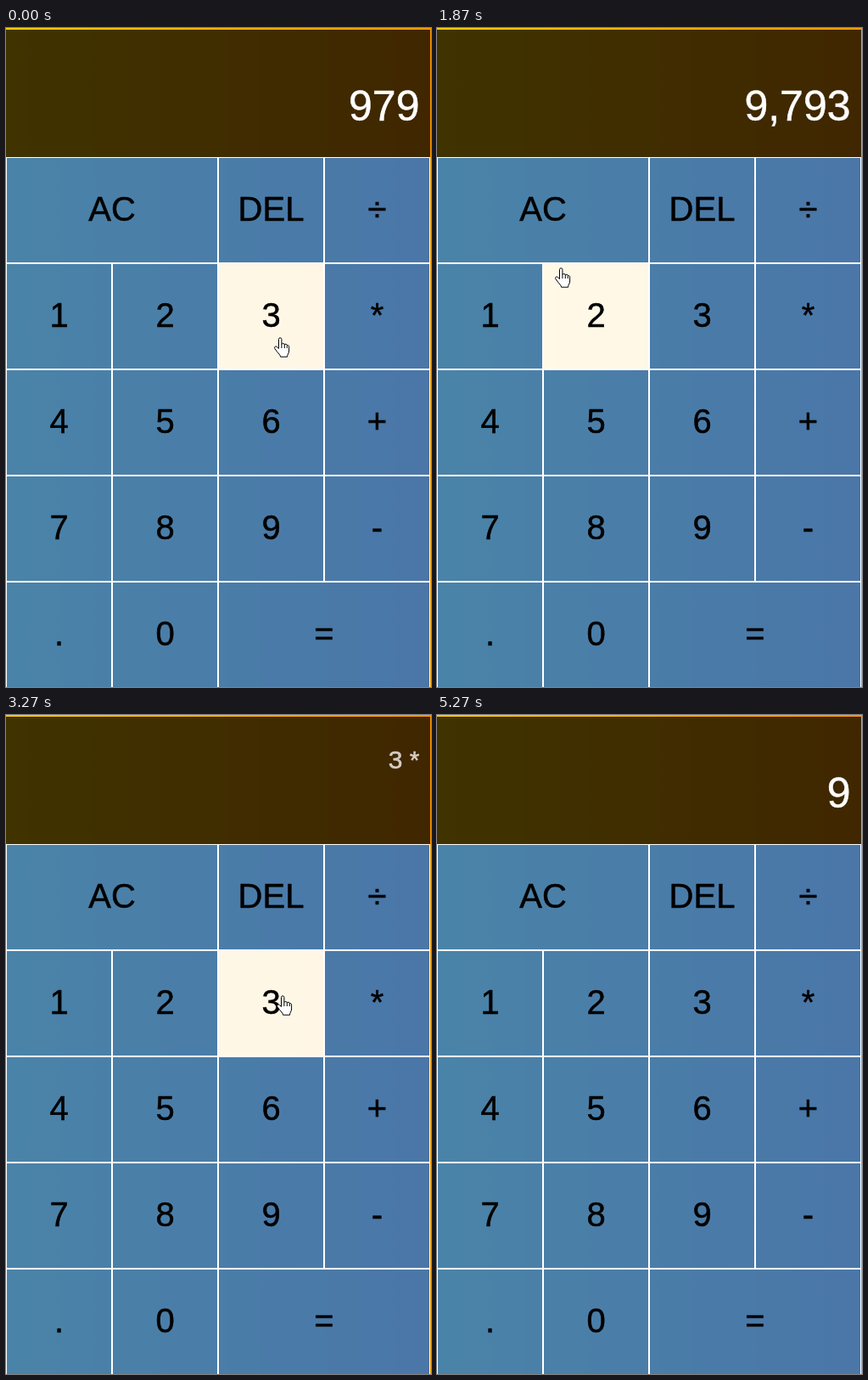
An HTML page that plays this animation: 501 px wide and 776 px high, repeating every 5940 ms.

```html
<!DOCTYPE html>
<html lang="en">
<head>
<meta charset="utf-8">
<title>Calculator</title>
<style>
  html, body { margin: 0; width: 501px; height: 776px; overflow: hidden; }
  body {
    position: relative;
    background: linear-gradient(to right, #fc0, #f90);
    font-family: "Liberation Sans", Arial, sans-serif;
    -webkit-text-stroke: .5px;
  }
  #display { position: absolute; top: 2px; width: 500px; height: 150px; background: rgba(0, 0, 0, .75); }
  #display div { position: absolute; right: 12.5px; white-space: pre; }
  #previous { top: 34px; font-size: 30px; line-height: 33px; color: rgba(255, 255, 255, .75); }
  #current { top: 62px; font-size: 50px; line-height: 56px; color: #fff; }
  #keys {
    position: absolute; top: 152px;
    display: grid; grid-template-columns: repeat(4, 125px); grid-auto-rows: 125px;
  }
  #keys div {
    display: flex; align-items: center; justify-content: center;
    box-sizing: border-box; border: 1px solid #fff; padding-bottom: 2px;
    font-size: 40px; background: rgba(14, 107, 224, .75) padding-box;
  }
  #keys .wide { grid-column: span 2; }
  #keys .hover { background-color: rgba(255, 255, 255, .9); }
  #hand { position: absolute; left: 0; top: 0; overflow: visible; }
</style>
</head>
<body>
<div id="display"><div id="previous"></div><div id="current"></div></div>
<div id="keys"></div>
<svg id="hand" width="18" height="25" fill="#fff" stroke="#000" stroke-linejoin="round">
  <path d="M5.5 13.5V2.5a1.7 1.7 0 0 1 3.4 0V8.6q.3-1.3 1.8-1.2 1.5.1 1.6 1.6 .4-1 1.6-.8 1.3.2 1.4 1.6 .5-.6 1.3-.3 1 .4 1 1.7V16q0 2.2-1.3 4.2-.7 1.2-.7 3H7.6q-.2-1.6-1.6-3.2Q3.6 17.4 1 13.8q-1-1.7.2-2.6 1.3-.8 2.6.6z"/>
  <path fill="none" d="M8.9 8.6v4.4M12.3 9v4M15.3 10v3"/>
</svg>
<script>
const LOOP = 5940, TICK = 1000 / 15, HEIGHT = 776;
const $ = id => document.getElementById(id);

const keys = ['AC', 'DEL', '÷', ...'123*456+789-.0='].map(label => {
  const el = document.createElement('div');
  el.textContent = label;
  if (label === 'AC' || label === '=') el.className = 'wide';
  $('keys').append(el);
  return el;
});

// Pointer moves: start tick, ticks taken, left, top
const home = [316, 364];
const moves = [
  [10, 6, 377, 371], [19, 5, 340, 681], [24, 8, 110, 225], [35, 5, 324, 345],
  [43, 2, 384, 340], [48, 1, 319, 330], [51, 5, 432, 709], [61, 1, 425, 724],
  [74, 5, 420, HEIGHT]
];
const clicks = [9, 35, 43, 48, 51, 59];

function pointer(tick) {
  let [x, y] = home;
  for (const [start, ticks, toX, toY] of moves) {
    const u = Math.min(1, Math.max(0, (tick - start) / ticks));
    const ease = 1 - (1 - u) ** 3;
    x += (toX - x) * ease;
    y += (toY - y) * ease;
  }
  return { x, y };
}

// The fingertip sits 6px right of the pointer's left edge
function keyAt({ x, y }) {
  if (y >= HEIGHT) return;
  return keys.find(k => {
    const dx = x + 6 - k.offsetLeft, dy = y - 152 - k.offsetTop;
    return dx >= 0 && dx < k.offsetWidth && dy >= 0 && dy < k.offsetHeight;
  });
}

const operators = {
  '÷': (a, b) => a / b, '*': (a, b) => a * b,
  '+': (a, b) => a + b, '-': (a, b) => a - b
};

function press({ previous, op, current }, label) {
  if (label === 'AC') return { previous: '', op: '', current: '' };
  if (label in operators) return { previous: current, op: label, current: '' };
  if (label === '=') return { previous: '', op: '', current: String(operators[op](+previous, +current)) };
  return { previous, op, current: current + label };
}

const format = digits => digits && Number(digits).toLocaleString('en');

function draw(now) {
  const tick = Math.floor((now % LOOP + 4) / TICK);
  const state = clicks.filter(c => c <= tick)
    .reduce((s, c) => press(s, keyAt(pointer(c)).textContent), { previous: '', op: '', current: '979' });
  $('previous').textContent = state.op && `${format(state.previous)} ${state.op}`;
  $('current').textContent = format(state.current);

  const hand = pointer(tick), hovered = keyAt(hand);
  $('hand').style.transform = `translate(${Math.round(hand.x)}px, ${Math.round(hand.y)}px)`;
  $('hand').style.display = hand.y < HEIGHT ? '' : 'none';
  for (const k of keys) k.classList.toggle('hover', k === hovered);
}

const start = performance.now();
function loop() {
  draw(performance.now() - start);
  requestAnimationFrame(loop);
}
loop();
</script>
</body>
</html>
```
